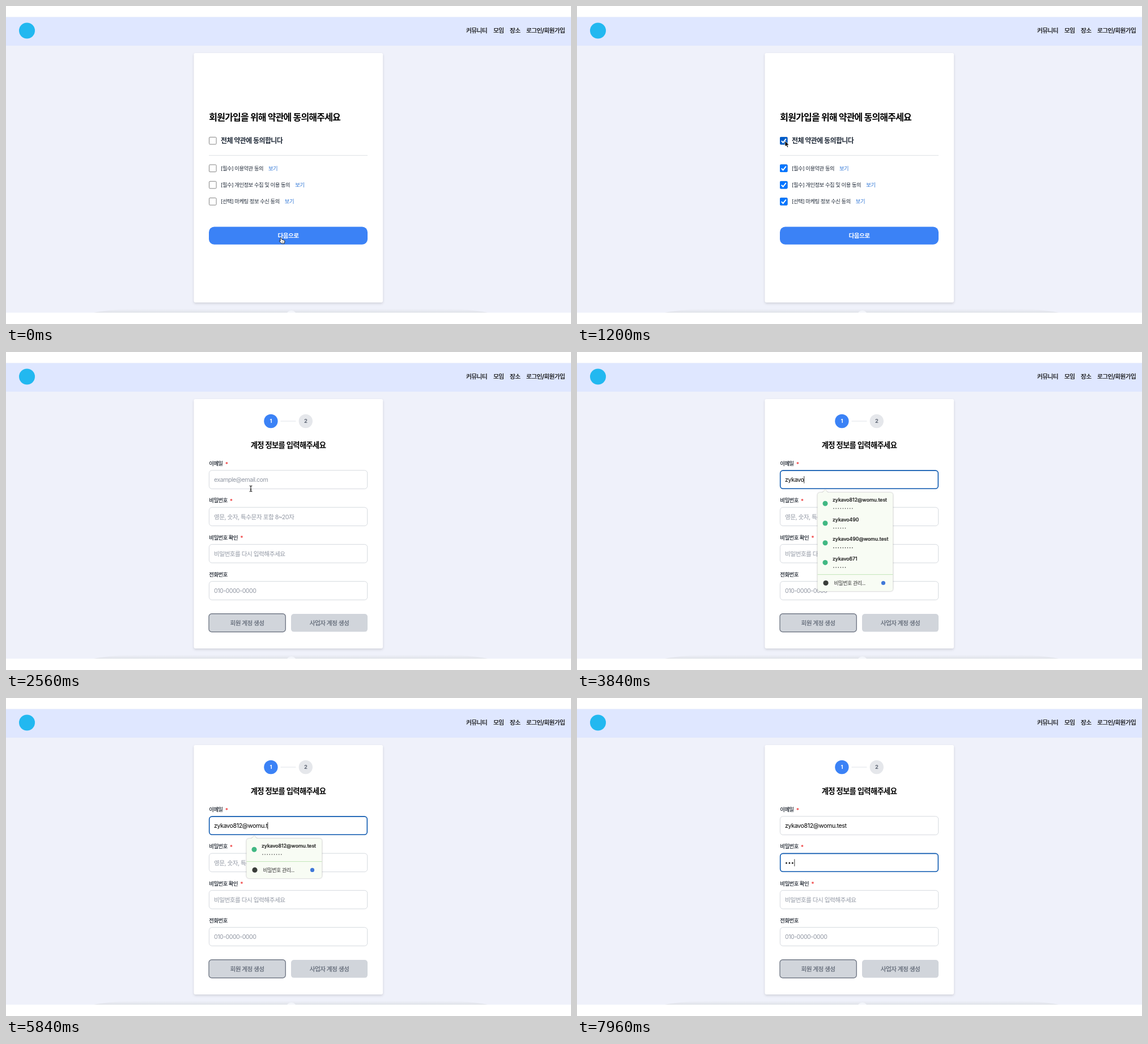
Write an HTML page that moves like this. It is 997 px wide and 561 px high and loops after 8 s.

```html
<!DOCTYPE html>
<html lang="ko">
<head>
<meta charset="utf-8">
<style>
  html, body { margin: 0; width: 100%; height: 100%; overflow: hidden; background: #fff; }
  svg { display: block; width: 997px; height: 561px; }
  text { font-family: Inter, "Noto Sans CJK KR", "Noto Sans CJK", sans-serif; letter-spacing: -.05em; }
  #typed { letter-spacing: -.035em; }
  .plain { letter-spacing: 0; }
  .card { filter: drop-shadow(0 2px 2px rgba(0, 0, 0, .13)); }
  .popup { filter: drop-shadow(0 .6px 1.3px rgba(0, 0, 0, .36)); }
</style>
</head>
<body>
<svg id="stage" viewBox="0 0 997 561"></svg>
<script>
const LOOP = 8000;
const EMAIL = 'zykavo812@womu.test';
const ACCOUNTS = [[EMAIL, 9], ['zykavo490', 6], ['zykavo490@womu.test', 9], ['zykavo671', 6]];
const EMAIL_KEYS = [3200, 3320, 3440, 3560, 3680, 3840, 4320, 4600, 4880, 5160,
  5280, 5400, 5500, 5600, 5720, 5800, 5920, 6000, 6160];
const PASSWORD_KEYS = [7080, 7600, 7960];
const HOVER_ON = 500, HOVER_OFF = 880, HOVER_AGAIN = 1525, FADE = 150;
const CHECK_AT = 1160, PAGE_AT = 1760, EMAIL_FOCUS = 2800, FILTER_AT = 4320, PASSWORD_FOCUS = 6680;
const FIELD_STEP = 65.3, ROW_STEP = 34.7;
const CURSOR = [[0, 486, 414], [800, 486, 414], [1120, 367, 238], [1240, 367, 238], [1600, 484, 407],
  [2360, 484, 407], [2560, 432, 241], [2720, 432, 228], [6240, 432, 228], [6600, 382, 282], [LOOP, 382, 282]];

const rect = (x, y, w, h, r, fill, extra = '') =>
  `<rect x="${x}" y="${y}" width="${w}" height="${h}" rx="${r}" fill="${fill}" ${extra}/>`;
const circle = (x, y, r, fill) => `<circle cx="${x}" cy="${y}" r="${r}" fill="${fill}"/>`;
const line = (x1, x2, y, color) => `<path d="M${x1} ${y}H${x2}" stroke="${color}"/>`;
const outline = (d, color, width) => `<path d="${d}" fill="none" stroke="${color}" stroke-width="${width}"/>`;
// Medium weight gets a hairline stroke, since the Korean face has no such cut.
const text = (x, y, str, size, fill, weight = 400, extra = '') =>
  `<text x="${x}" y="${y}" font-size="${size}" fill="${fill}" font-weight="${weight}"
    ${weight === 500 ? `stroke="${fill}" stroke-width=".22"` : ''} ${extra}>${str}</text>`;
const group = (id, body, extra = '') => `<g id="${id}" ${extra}>${body}</g>`;
const MIDDLE = 'text-anchor="middle"';
const dots = (n, x, y, step, r, fill) =>
  Array.from({ length: n }, (_, i) => circle(x + i * step, y, r, fill)).join('');

function checkbox(i, cy) {
  const top = cy - 6.7;
  return rect(358.5, top + .4, 12.6, 12.6, 1.6, '#fff', 'stroke="#767676" stroke-width=".9"') +
    group('check' + i, rect(358, top, 13.5, 13.5, 1.7, '#0075ff') +
      outline(`M360.8 ${cy + .2}l2.8 3 5.2-6.6`, '#fff', 2));
}

function term(i, label, linkX) {
  const cy = 286.3 + i * 29.3;
  return checkbox(i + 1, cy) + text(379, cy + 3.4, label, 9.33, '#1f2937') +
    text(linkX, cy + 3.4, '보기', 9.33, '#2f76d6');
}

function field(i, label, starX, hint) {
  const y = i * FIELD_STEP;
  return text(358.3, 200 + y, label, 9.33, '#1a212c', 500) +
    (starX ? text(starX, 200.5 + y, '*', 9.33, '#ef4444', 500) : '') +
    rect(358.4, 208.8 + y, 279.3, 32.6, 5, '#fff', 'stroke="#d1d5db" stroke-width=".9"') +
    text(367, 229.2 + y, hint, 10.67, '#9298a4', 400, `id="hint${i}"`);
}

function focusRing(id, i) {
  return rect(358.7, 209.1 + i * FIELD_STEP, 278.6, 31.9, 4.8, 'none',
    `id="${id}" stroke="#0f5bb2" stroke-width="1.6"`);
}

function popup(id, y, count, divider) {
  const end = count * ROW_STEP;
  const rows = ACCOUNTS.slice(0, count).map(([name, length], i) => {
    const top = i * ROW_STEP;
    return circle(438, top + 19.3, 4.5, '#41b883') +
      text(451, top + 16, name, 8.7, '#222', 500, 'class="plain"') +
      dots(length, 453, top + 28, 4.1, .8, '#333');
  }).join('');
  return group(id,
    `<path class="popup" d="M429 0H433L438-4.6 443 0H552.5q5 0 5 5V${end + 30.3}q0 5-5 5H429.4q-5 0-5-5V5q0-5 5-5z" fill="#f8fcf4"/>` +
    rows + line(424.4, 557.5, end + 5.8, divider) + circle(439, end + 20.7, 4.6, '#3a3d3a') +
    text(453.5, end + 23.8, '비밀번호 관리...', 9, '#333') + circle(540.5, end + 20.7, 3.6, '#3f78d8'),
    `transform="translate(0 ${y})"`);
}

const backdrop =
  `<defs><linearGradient id="haze" x2="0" y2="1"><stop stop-color="#e2e4ea" stop-opacity="0"/>
    <stop offset="1" stop-color="#dfe2e8"/></linearGradient>
    <clipPath id="page"><rect y="19.5" width="997" height="521.5"/></clipPath></defs>` +
  group('back', rect(0, 19, 997, 523, 0, '#eff1fa') + rect(0, 19, 997, 51, 0, '#dfe7ff') +
    '<path d="M155 541Q190 534 240 534H765Q815 534 850 541z" fill="url(#haze)"/>' +
    circle(503.5, 546, 9, '#f3f5fa'), 'clip-path="url(#page)"') +
  circle(37, 43.5, 14, '#22b8f0') +
  [[812, '커뮤니티'], [860, '모임'], [889, '장소'], [918, '로그인/회원가입']]
    .map(([x, label]) => text(x, 47.2, label, 10.67, '#000', 500)).join('') +
  rect(331.5, 83, 333.5, 440, 3, '#fff', 'class="card"');

const termsPage = group('terms',
  text(358.3, 202, '회원가입을 위해 약관에 동의해주세요', 16, '#000', 700) +
  checkbox(0, 237.7) + text(379, 241.8, '전체 약관에 동의합니다', 12, '#1f2937', 600) +
  line(358, 638, 263.5, '#dfe2e6') +
  term(0, '[필수] 이용약관 동의', 463) +
  term(1, '[필수] 개인정보 수집 및 이용 동의', 510.3) +
  term(2, '[선택] 마케팅 정보 수신 동의', 491.8) +
  rect(358, 389.5, 280, 31.3, 9.5, '#3b82f6') +
  rect(358, 389.5, 280, 31.3, 9.5, '#2563eb', 'id="hover"') +
  text(498, 409, '다음으로', 10.67, '#fff', 600, MIDDLE));

const accountPage = group('account',
  circle(467.4, 122, 12.2, '#3b82f6') + text(467.2, 125.4, '1', 9.33, '#fff', 700, MIDDLE) +
  line(484.5, 511.5, 122, '#e0e3e8') +
  circle(528.8, 122, 12.2, '#e5e7eb') + text(528.6, 125.4, '2', 9.33, '#5f6775', 700, MIDDLE) +
  text(498, 169.4, '계정 정보를 입력해주세요', 13.33, '#000', 700, MIDDLE) +
  field(0, '이메일', 387, 'example@email.com') +
  field(1, '비밀번호', 395, '영문, 숫자, 특수문자 포함 8~20자') +
  field(2, '비밀번호 확인', 413.5, '비밀번호를 다시 입력해주세요') +
  field(3, '전화번호', 0, '010-0000-0000') +
  rect(358, 461.8, 135.3, 32, 5, '#d1d5db', 'stroke="#747b88" stroke-width="1.4"') +
  rect(503, 462, 135, 31.6, 5, '#d1d5db') +
  text(425.5, 481.8, '회원 계정 생성', 10.67, '#5d6573', 500, MIDDLE) +
  text(570.5, 481.8, '사업자 계정 생성', 10.67, '#5d6573', 500, MIDDLE) +
  focusRing('emailRing', 0) + focusRing('passwordRing', 1) +
  text(367, 229.2, '', 10.67, '#000', 400, 'id="typed"') +
  PASSWORD_KEYS.map((_, i) => group('dot' + i, circle(369.5 + i * 5.4, 291.2, 1.35, '#111'))).join('') +
  rect(0, 0, .9, 12.6, 0, '#222', 'id="caret"') +
  popup('allAccounts', 248, 4, '#c3e6b9') + popup('oneAccount', 248, 1, '#c3e6b9') +
  popup('passwordAccounts', 248 + FIELD_STEP, 4, '#dde5da'));

const BEAM = 'M-2.4-5Q0-5 0-3.5Q0-5 2.4-5M0-3.5V3.5M-2.4 5Q0 5 0 3.5Q0 5 2.4 5M-1.3 1.3H1.3';
const pointers =
  group('arrow', '<path d="M0 0V10L2.3 8 4 11.6 5.8 10.8 4.2 7.2H7.3z" fill="#000" stroke="#fff" stroke-width=".8"/>') +
  group('hand', `<path d="M-2-4.6q1.2-1 2 .3L1-1.8l4 1.1q1 .4.9 1.7L5.2 5H.2L-3.8.8q.3-1.4 2-.3z"
    fill="#fff" stroke="#111" stroke-width=".9"/>` + outline('M1.4 1.2V3.4M3.3 1.4V3.5', '#111', .6)) +
  group('beam', outline(BEAM, '#fff', 2) + outline(BEAM, '#111', 1.1));

document.getElementById('stage').innerHTML =
  backdrop + termsPage + accountPage + group('cursor', pointers);

const el = id => document.getElementById(id);
const show = (id, on) => { el(id).style.display = on ? '' : 'none'; };
const pressed = (keys, t) => keys.filter(at => at <= t).length;
const fade = (t, from) => Math.min(1, Math.max(0, (t - from) / FADE));

function cursorAt(t) {
  const i = CURSOR.findIndex(key => key[0] > t);
  const [t0, x0, y0] = CURSOR[i - 1], [t1, x1, y1] = CURSOR[i];
  const p = (t - t0) / (t1 - t0), ease = p * p * (3 - 2 * p);
  return [x0 + (x1 - x0) * ease, y0 + (y1 - y0) * ease];
}

function drawCursor(t) {
  const [x, y] = cursorAt(t), onTerms = t < PAGE_AT;
  const inside = x > 358 && x < 638;
  const hand = onTerms && inside && y > 389 && y < 421;
  const beam = !onTerms && inside && y > 208 && y < 438 && (y - 208.5) % FIELD_STEP < 33;
  show('cursor', t < EMAIL_KEYS[0] || t >= 6240 && t < PASSWORD_KEYS[0]);
  el('cursor').setAttribute('transform', `translate(${x} ${y})`);
  show('hand', hand);
  show('beam', beam);
  show('arrow', !hand && !beam);
  const overCheck = Math.abs(x - 365) < 7 && Math.abs(y - 238) < 7;
  el('check0').firstChild.setAttribute('fill', overCheck ? '#005cc8' : '#0075ff');
}

function draw(t) {
  const letters = pressed(EMAIL_KEYS, t), secrets = pressed(PASSWORD_KEYS, t);
  const onEmail = t >= EMAIL_FOCUS && t < PASSWORD_FOCUS, onPassword = t >= PASSWORD_FOCUS;
  show('terms', t < PAGE_AT);
  show('account', t >= PAGE_AT);
  for (let i = 0; i < 4; i++) show('check' + i, t >= CHECK_AT);
  el('hover').setAttribute('opacity', fade(t, HOVER_ON) - fade(t, HOVER_OFF) + fade(t, HOVER_AGAIN));

  el('typed').textContent = EMAIL.slice(0, letters);
  show('hint0', !letters);
  show('hint1', !secrets);
  PASSWORD_KEYS.forEach((_, i) => show('dot' + i, i < secrets));
  show('emailRing', onEmail);
  show('passwordRing', onPassword);
  show('allAccounts', onEmail && t >= EMAIL_FOCUS + 80 && t < FILTER_AT);
  show('oneAccount', onEmail && t >= FILTER_AT);
  show('passwordAccounts', t >= PASSWORD_FOCUS + 80 && !secrets);

  show('caret', onEmail || onPassword);
  const typedWidth = letters ? el('typed').getComputedTextLength() : 0;
  el('caret').setAttribute('x', onPassword ? 366.6 + secrets * 5.6 : 366.8 + typedWidth);
  el('caret').setAttribute('y', 219 + (onPassword ? FIELD_STEP : 0));
  drawCursor(t);
}

const start = performance.now();
function tick() {
  draw((performance.now() - start) % LOOP);
  requestAnimationFrame(tick);
}
tick();
</script>
</body>
</html>
```
